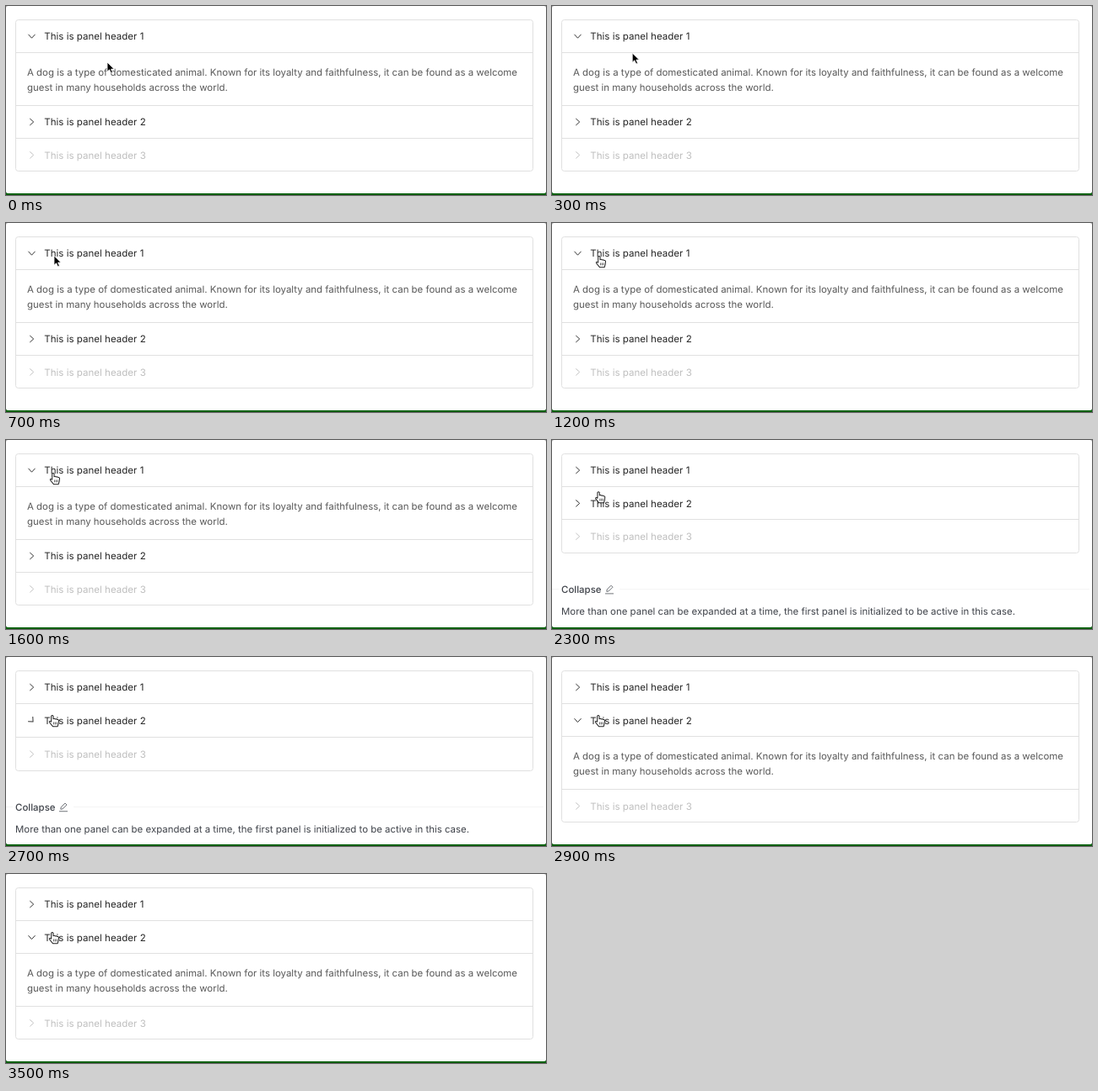
Recreate the animation shown at these times as an HTML page. Size 640 by 225 pixels, loop 3600 ms.

```html
<!DOCTYPE html>
<html lang="en">
<head>
<meta charset="utf-8">
<title>Collapse panels</title>
<style>
  html, body { margin: 0; width: 100%; height: 100%; overflow: hidden; background: #a8a8a8; }
  svg { display: block; }
  text { font: 11.45px Inter, "Liberation Sans", sans-serif; fill: #262626; text-rendering: geometricPrecision; }
  .head text { font-size: 11.55px; }
  .off text { fill: #bfbfbf; }
  .off .chevron { stroke: #c4c4c4; }
  .body text { fill: #595959; }
  #below text { fill: #40444b; }
  .line { fill: none; stroke: #e0e0e0; }
  .chevron { fill: none; stroke: #333; stroke-linejoin: round; }
  .cursor { stroke-linejoin: round; }
</style>
</head>
<body>
<svg width="640" height="225" viewBox="0 0 640 225">
  <rect y="218" width="640" height="7" fill="#07600c"/>
  <rect width="640" height="223" rx="2.5" fill="#fff"/>
  <svg width="640" height="223">
    <rect id="frame" class="line" x="11.5" y="16.5" width="613" rx="3"/>
    <g id="panels"></g>
    <g id="below">
      <path d="M0 43.5H8M80 43.5H637" stroke="#f4f4f4"/>
      <text x="11" y="48.2" style="font-weight:500">Collapse</text>
      <path d="M63 48.7H73M64.8 46.2L65.2 43.8L70 39L72 41L67.2 45.8Z" fill="none" stroke="#60646a" stroke-width=".9"/>
      <text x="11" y="74.2">More than one panel can be expanded at a time, the first panel is initialized to be active in this case.</text>
    </g>
    <g id="arrow" class="cursor">
      <path d="M0 0V11.2L2.6 8.8L4.5 13L6.4 12.2L4.6 8.1H8.2Z" fill="#000" stroke="#fff" stroke-width=".8"/>
    </g>
    <g id="hand" class="cursor">
      <g transform="scale(1.12)">
        <path d="M-1 7V1Q0-.6 1.1 1V4Q2.3 3.2 3.2 4.3Q4.4 3.6 5.2 4.8Q6.6 4.4 6.9 5.8L6.6 9L5.7 12H.6L-3 7.6Q-3.4 5.6-1 7Z" fill="#fff" stroke="#222" stroke-width=".9"/>
        <path d="M1.6 7.4V10M3.2 7.4V10M4.8 7.4V10" stroke="#333" stroke-width=".7"/>
      </g>
    </g>
  </svg>
</svg>
<script>
const LOOP = 3600, STEP = 100, TOP = 16, HEADER = 39.4, BODY = 62.6;
const $ = id => document.getElementById(id);
const move = (el, x, y) => el.setAttribute('transform', `translate(${x} ${y})`);
const snap = y => Math.floor(y + 0.1) + 0.5;
const progress = (t, start, length) => Math.min(1, Math.max(0, (t - start) / length));
const ease = (...span) => {
  const p = progress(...span);
  return p < 0.5 ? 4 * p ** 3 : 1 - (2 - 2 * p) ** 3 / 2;
};
const smooth = (...span) => {
  const p = progress(...span);
  return p * p * (3 - 2 * p);
};

$('panels').innerHTML = [1, 2, 3].map(n => `
  <g class="panel${n === 3 ? ' off' : ''}">
    <g class="head">
      <path class="chevron" d="M-2.2-4L2.2 0L-2.2 4"/>
      <text x="45.3" y="24.2">This is panel header ${n}</text>
    </g>
    <svg class="body" width="640">
      <text x="25" y="27.2">A dog is a type of domesticated animal. Known for its loyalty and faithfulness, it can be found as a welcome</text>
      <text x="25" y="45.2">guest in many households across the world.</text>
    </svg>
    <path class="line inner"/>
    <path class="line outer"/>
  </g>`).join('');

const panels = [...document.querySelectorAll('.panel')].map(el => {
  const find = name => el.querySelector('.' + name);
  return { head: find('head'), chevron: find('chevron'), body: find('body'), inner: find('inner'), outer: find('outer') };
});

function draw(t) {
  const open = [1 - ease(t, 1649, 200), ease(t, 2670, 200), 0];
  const turn = [1 - ease(t, 1600, 200), ease(t, 2600, 200), 0];
  let y = TOP;
  panels.forEach((p, i) => {
    move(p.head, 0, y);
    p.chevron.setAttribute('transform', `translate(30.5 20) rotate(${90 * turn[i]})`);
    y += HEADER;
    p.body.setAttribute('y', y);
    p.body.setAttribute('height', BODY * open[i]);
    p.body.style.opacity = p.inner.style.opacity = open[i];
    p.inner.setAttribute('d', `M12 ${snap(y)}H624`);
    y += BODY * open[i];
    p.outer.setAttribute('d', i < 2 ? `M12 ${snap(y)}H624` : '');
  });
  $('frame').setAttribute('height', snap(y) - 16.5);
  move($('below'), 0, y);

  const approach = smooth(t, 0, 700), descend = smooth(t, 1900, 600), pointing = t >= 800;
  move($('arrow'), 120 - 63 * approach, 67 - 28 * approach);
  move($('hand'), 55.8 - descend, 39.2 + 30 * descend);
  $('arrow').style.display = pointing ? 'none' : '';
  $('hand').style.display = pointing ? '' : 'none';
}

const start = performance.now();
function tick() {
  const t = (performance.now() - start) % LOOP;
  draw(Math.floor(t / STEP) * STEP);
  requestAnimationFrame(tick);
}
tick();
</script>
</body>
</html>
```
